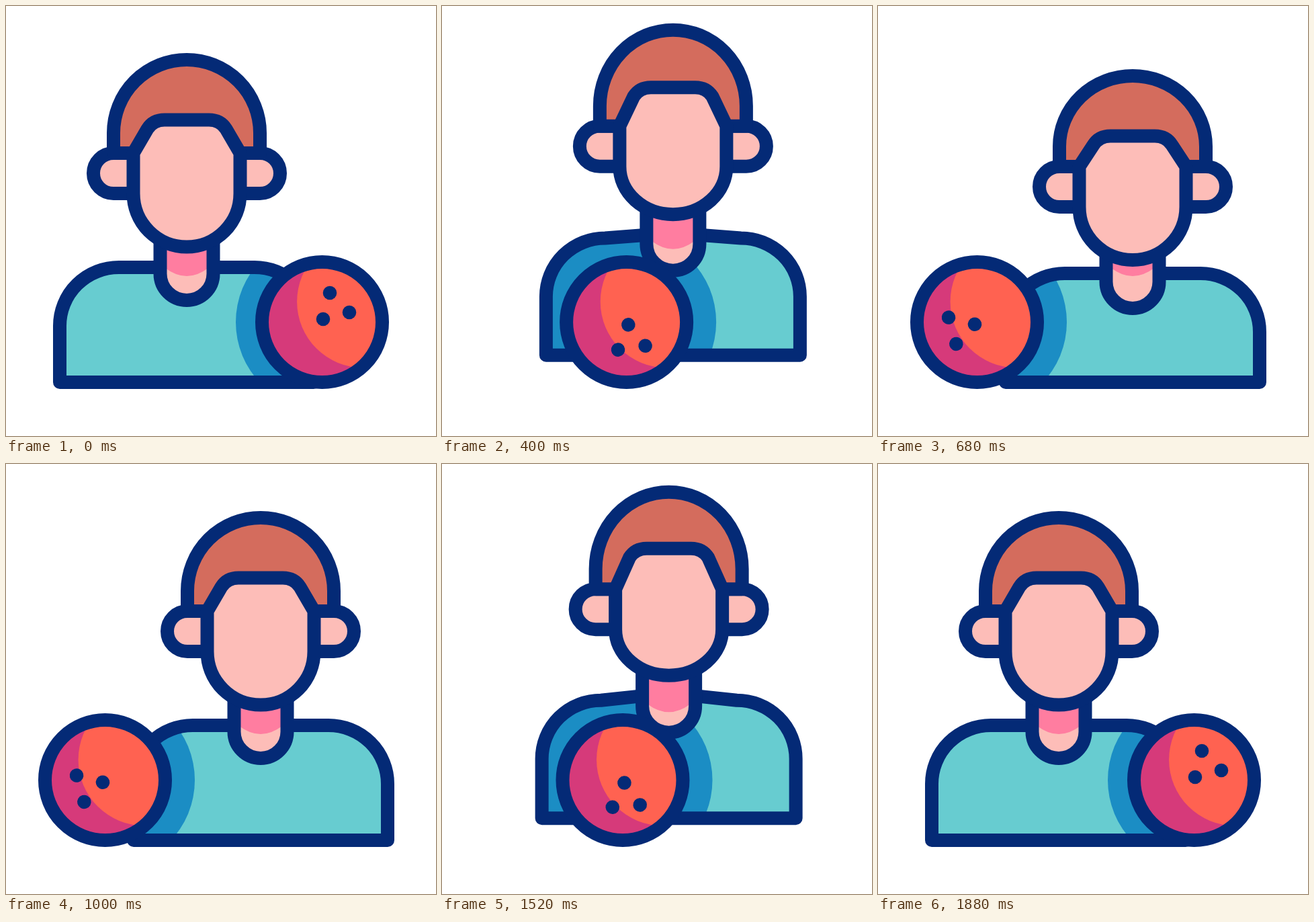
Animation, 640 px wide and 640 px high, one loop 2 s. Source, as an HTML page with a canvas:

```html
<!DOCTYPE html>
<html lang="en">
<head>
<meta charset="utf-8">
<title>Bowler</title>
<style>
  html, body { margin: 0; width: 100%; height: 100%; overflow: hidden; background: #fff; }
  canvas { display: block; width: 640px; height: 640px; }
</style>
</head>
<body>
<canvas id="stage" width="640" height="640"></canvas>
<script>
const ctx = document.getElementById('stage').getContext('2d');
const LOOP = 2000, STEP = 40;
const NAVY = '#042a76', SHIRT = '#67ccd0', SHADE = '#1b8dc4', HAIR = '#d46c5d',
  SKIN = '#fdbdb8', BLUSH = '#ff7da0', BALL = '#ff6251', BALL_DARK = '#d63a7a';

// Easing
const smooth = p => p * p * (3 - 2 * p);
const fall = p => p ** 1.5;
function lively(p) {
  let lo = 0, hi = 1;
  for (let i = 0; i < 24; i++) {
    const s = (lo + hi) / 2, r = 1 - s;
    const x = 3 * r * r * s * 0.2 + 3 * r * s * s * 0.63 + s ** 3;
    if (x < p) lo = s; else hi = s;
  }
  return smooth(lo);
}

// Keys are [time, value, easing towards this key]
function track(keys, t) {
  if (t <= keys[0][0]) return keys[0][1];
  for (let i = 1; i < keys.length; i++) {
    const [t0, v0] = keys[i - 1], [t1, v1, ease = smooth] = keys[i];
    if (t < t1) return v0 + (v1 - v0) * ease((t - t0) / (t1 - t0));
  }
  return keys[keys.length - 1][1];
}

const WALK = [[80, 269], [640, 379, lively], [1320, 379], [1800, 269]];
const ROLL = [[80, 0], [640, 1], [1320, 1], [1800, 0]];
const JUMP = [[80, 0], [280, -54, lively], [580, 0, fall], [1320, 0], [1600, -41], [1880, 0]];
const STRETCH = [[80, 0], [200, 8], [400, 8], [560, 0], [1320, 0], [1520, 11], [1620, 11], [1860, 0]];
const SQUASH = [[560, 0], [680, 1], [1000, 0]];

function shape(fill, build, stroke = true) {
  ctx.beginPath();
  build();
  ctx.fillStyle = fill;
  ctx.fill();
  if (stroke) ctx.stroke();
}
const disc = (x, y, r) => ctx.arc(x, y, r, 0, Math.PI * 2);

function drawBody(jump, stretch, squash, ballX) {
  const shoulder = jump - 0.4 * stretch + 9 * squash;
  const collar = 389 + jump - stretch + 9 * squash;
  const bottom = 560 + jump, top = 389 + shoulder, side = 476 + shoulder;
  const outline = () => {
    ctx.moveTo(-189, bottom);
    ctx.lineTo(-189, side);
    ctx.ellipse(-101, side, 88, side - top, 0, Math.PI, Math.PI * 1.5);
    ctx.lineTo(-39, collar);
    ctx.lineTo(39, collar);
    ctx.lineTo(101, top);
    ctx.ellipse(101, side, 88, side - top, 0, -Math.PI / 2, 0);
    ctx.lineTo(189, bottom);
    ctx.closePath();
  };
  shape(SHIRT, outline, false);
  ctx.save();
  ctx.clip();
  shape(SHADE, () => disc(ballX + 2.5, 470.5, 131), false);
  ctx.restore();
  ctx.beginPath();
  outline();
  ctx.stroke();
}

function drawNeck(jump, stretch, squash) {
  const base = 398.5 + jump - 0.5 * stretch + 12 * squash;
  const top = 345 + jump - stretch + 20 * squash;
  const outline = () => {
    ctx.moveTo(-39.5, top);
    ctx.lineTo(-39.5, base);
    ctx.arc(0, base, 39.5, Math.PI, 0, true);
    ctx.lineTo(39.5, top);
  };
  shape(SKIN, outline, false);
  shape(BLUSH, () => {
    ctx.moveTo(-32, top);
    ctx.lineTo(-32, 390 + jump);
    ctx.quadraticCurveTo(0, 414 + jump, 32, 390 + jump);
    ctx.lineTo(32, top);
  }, false);
  ctx.beginPath();
  outline();
  ctx.stroke();
}

function drawHead(jump, stretch, squash) {
  const ear = jump + 20 * squash;
  const brow = jump - stretch + 24 * squash;
  const chin = 358.5 + jump - stretch + 19.5 * squash;
  const crown = 80 + jump - 0.5 * stretch + 24 * squash;
  const temple = 219 + ear, jaw = 279 + ear, arch = 189 + ear;

  for (const s of [-1, 1]) shape(SKIN, () => {
    ctx.moveTo(s * 79.5, temple);
    ctx.lineTo(s * 109, temple);
    ctx.arc(s * 109, temple + 30, 30, -Math.PI / 2, Math.PI / 2, s < 0);
    ctx.lineTo(s * 79.5, jaw);
  });
  shape(HAIR, () => {
    ctx.moveTo(-109, temple);
    ctx.lineTo(-109, arch);
    ctx.ellipse(0, arch, 109, arch - crown, 0, Math.PI, Math.PI * 2);
    ctx.lineTo(109, temple);
    ctx.closePath();
  });
  shape(SKIN, () => {
    ctx.moveTo(-79.5, temple);
    ctx.lineTo(-58.5, 183 + brow);
    ctx.quadraticCurveTo(-50, 169.5 + brow, -33, 169.5 + brow);
    ctx.lineTo(33, 169.5 + brow);
    ctx.quadraticCurveTo(50, 169.5 + brow, 58.5, 183 + brow);
    ctx.lineTo(79.5, temple);
    ctx.lineTo(79.5, jaw);
    ctx.ellipse(0, jaw, 79.5, chin - jaw, 0, 0, Math.PI);
    ctx.closePath();
  });
}

function drawBall(x, roll) {
  ctx.save();
  ctx.translate(x, 470.5);
  shape(BALL_DARK, () => disc(0, 0, 89.5), false);
  ctx.save();
  ctx.clip();
  shape(BALL, () => disc(61 - 2.5 * roll, -30.5, 98.4), false);
  ctx.restore();
  ctx.beginPath();
  disc(0, 0, 89.5);
  ctx.stroke();
  ctx.rotate(roll * 209 * Math.PI / 180);
  for (const [hx, hy] of [[11.5, -43.5], [40.5, -14.5], [1.5, -4.5]])
    shape(NAVY, () => disc(hx, hy, 10.3), false);
  ctx.restore();
}

function draw(t) {
  const x = track(WALK, t), roll = track(ROLL, t);
  const pose = [JUMP, STRETCH, SQUASH].map(keys => track(keys, t));
  const ballX = 470.5 - 323 * roll;

  ctx.fillStyle = '#fff';
  ctx.fillRect(0, 0, 640, 640);
  ctx.strokeStyle = NAVY;
  ctx.lineWidth = 20;
  ctx.lineJoin = 'round';

  ctx.save();
  ctx.translate(x, 0);
  drawBody(...pose, ballX - x);
  drawNeck(...pose);
  drawHead(...pose);
  ctx.restore();
  drawBall(ballX, roll);
}

const start = performance.now();
function tick() {
  const t = (performance.now() - start) % LOOP;
  draw(Math.floor(t / STEP) * STEP);
  requestAnimationFrame(tick);
}
tick();
</script>
</body>
</html>
```
